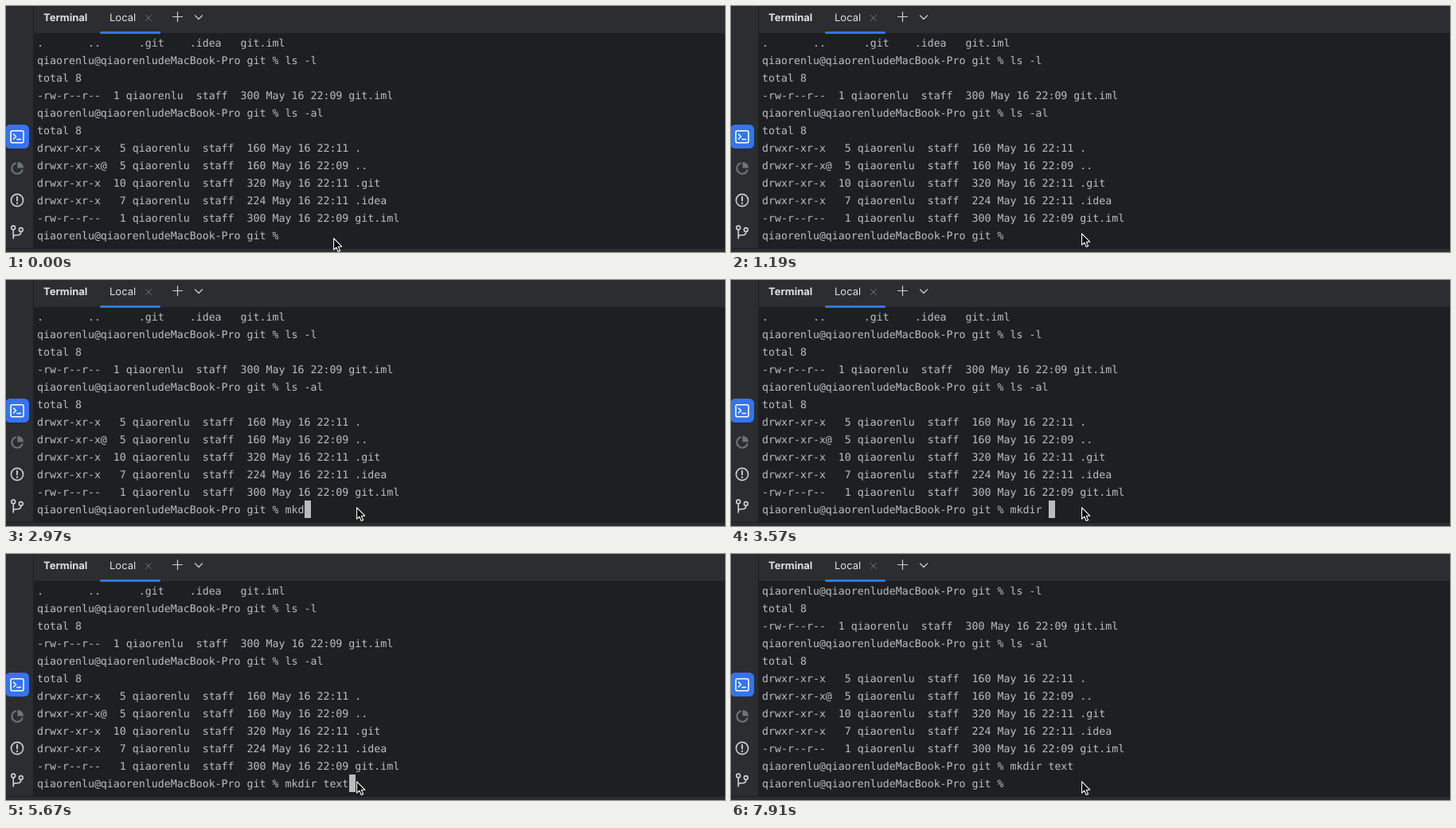
These frames come from a looping animation (903x309 px, 8 s). An HTML page:

```html
<!DOCTYPE html>
<html lang="en">
<head>
<meta charset="utf-8">
<title>Terminal</title>
<style>
  html, body { margin: 0; width: 100%; height: 100%; overflow: hidden; background: #1e1f22; }
  svg { display: block; width: 903px; height: 309px; }
  text { white-space: pre; text-rendering: geometricPrecision; }
  .ui { font: 13px Inter, sans-serif; fill: #dfe1e5; }
  .title { font-weight: 700; }
  .mono { font: 13.289px "DejaVu Sans Mono", monospace; fill: #bcbec4; }
  .line { fill: none; stroke: #ced0d6; stroke-width: 1.2; stroke-linecap: round; stroke-linejoin: round; }
  .bold { stroke-width: 1.6; }
</style>
</head>
<body>
<svg viewBox="0 0 903 309" xmlns="http://www.w3.org/2000/svg">
  <rect width="903" height="309" fill="#2b2d30"/>
  <rect x="35" y="34" width="868" height="270" fill="#1e1f22"/>
  <rect x="34" width="1" height="304" fill="#1e1f22"/>
  <rect y="304" width="903" height="1" fill="#1e1f22"/>

  <text class="ui title" x="47" y="19">Terminal</text>
  <text class="ui" x="130" y="19">Local</text>
  <rect x="118" y="32" width="76" height="3" rx="1.5" fill="#3574f0"/>
  <path class="line" d="M175.5 11.5l7 7m0-7l-7 7" style="stroke:#6f737a;stroke-width:1"/>
  <path class="line" d="M209.5 13.5h12M215.5 7.5v12M237.5 12l4.5 4.5 4.5-4.5"/>

  <rect x="-1" y="149" width="30" height="30" rx="6" fill="#3574f0"/>
  <g class="line bold">
    <g style="stroke:#fff">
      <rect x="6" y="156.7" width="16" height="15" rx="2"/>
      <path d="M9.5 161l3 3-3 3M14 167.5h4.5"/>
    </g>
    <g style="stroke:#6f737a">
      <path d="M12 197.5a6.8 6.8 0 1 0 8.6 8.6" style="stroke-width:2"/>
      <path d="M15.2 196.8a7 7 0 0 1 6 6h-6z" style="fill:#6f737a"/>
    </g>
    <circle cx="14" cy="244" r="7.6"/>
    <path d="M14 239.8v4.6" style="stroke-width:1.9"/>
    <circle cx="14" cy="247.7" r=".4"/>
    <circle cx="9.2" cy="278.5" r="2.4"/>
    <circle cx="18.8" cy="281" r="2.4"/>
    <path d="M9.2 281v11M18.8 283.5c0 3-1.5 4.2-4 4.2h-2.6c-2 0-3 1-3 3"/>
  </g>

  <g id="screen"></g>
  <rect id="caret" y="277" width="8" height="22" fill="#bbb"/>
  <path id="mouse" d="M.6 .9V15.2L3.9 12.1 6.2 17.5 8.6 16.5 6.3 11.2H10.7Z"
        fill="#000" stroke="#fff" stroke-width="1.1" stroke-linejoin="round"/>
</svg>
<script>
  const LOOP = 8000, LEFT = 39, CELL = 8, ROW = 22, BASE = 51, ROWS = 12;
  const user = "qiaorenlu";
  const prompt = `${user}@${user}deMacBook-Pro git % `;
  const entry = (mode, size, time, name) =>
    `${mode} ${user}  staff  ${size} May 16 ${time} ${name}`;

  const history = [
    ".       ..      .git    .idea   git.iml",
    prompt + "ls -l",
    "total 8",
    entry("-rw-r--r--  1", 300, "22:09", "git.iml"),
    prompt + "ls -al",
    "total 8",
    entry("drwxr-xr-x   5", 160, "22:11", "."),
    entry("drwxr-xr-x@  5", 160, "22:09", ".."),
    entry("drwxr-xr-x  10", 320, "22:11", ".git"),
    entry("drwxr-xr-x   7", 224, "22:11", ".idea"),
    entry("-rw-r--r--   1", 300, "22:09", "git.iml")
  ];

  const command = "mkdir text", ENTER = 5970;
  // Time at which each character of the command appears
  const keys = [1630, 2670, 2970, 3120, 3270, 3570, 5070, 5070, 5370, 5670];
  // The caret starts hidden and toggles at each of these times
  const blinks = [440, 890, 1490, 2230, 2670, 4620, 5070, 7020, 7470, 7910];
  // Pointer: time, x, y
  const moves = [
    [0, 411, 291], [440, 635, 268], [590, 652, 270], [740, 491, 239],
    [890, 473, 281], [1040, 443, 290], [1190, 440, 285]
  ];

  const byId = id => document.getElementById(id);
  const passed = (times, t) => times.filter(at => at <= t).length;

  const rows = Array.from({ length: ROWS }, (_, i) => {
    const row = document.createElementNS("http://www.w3.org/2000/svg", "text");
    row.setAttribute("class", "mono");
    row.setAttribute("x", LEFT);
    row.setAttribute("y", BASE + i * ROW);
    return byId("screen").appendChild(row);
  });

  function draw(t) {
    const entered = t >= ENTER;
    const typed = command.slice(0, passed(keys, t));
    const lines = [...history, prompt + typed];
    if (entered) lines.push(prompt);
    lines.slice(-ROWS).forEach((line, i) => {
      if (rows[i].textContent !== line) rows[i].textContent = line;
    });

    const column = prompt.length + (entered ? 0 : typed.length);
    byId("caret").setAttribute("x", LEFT + column * CELL);
    byId("caret").setAttribute("visibility", passed(blinks, t) % 2 ? "visible" : "hidden");

    const [, x, y] = moves[passed(moves.map(m => m[0]), t) - 1];
    byId("mouse").setAttribute("transform", `translate(${x} ${y})`);
  }

  const start = performance.now();
  function tick() {
    draw((performance.now() - start) % LOOP);
    requestAnimationFrame(tick);
  }
  tick();
</script>
</body>
</html>
```
